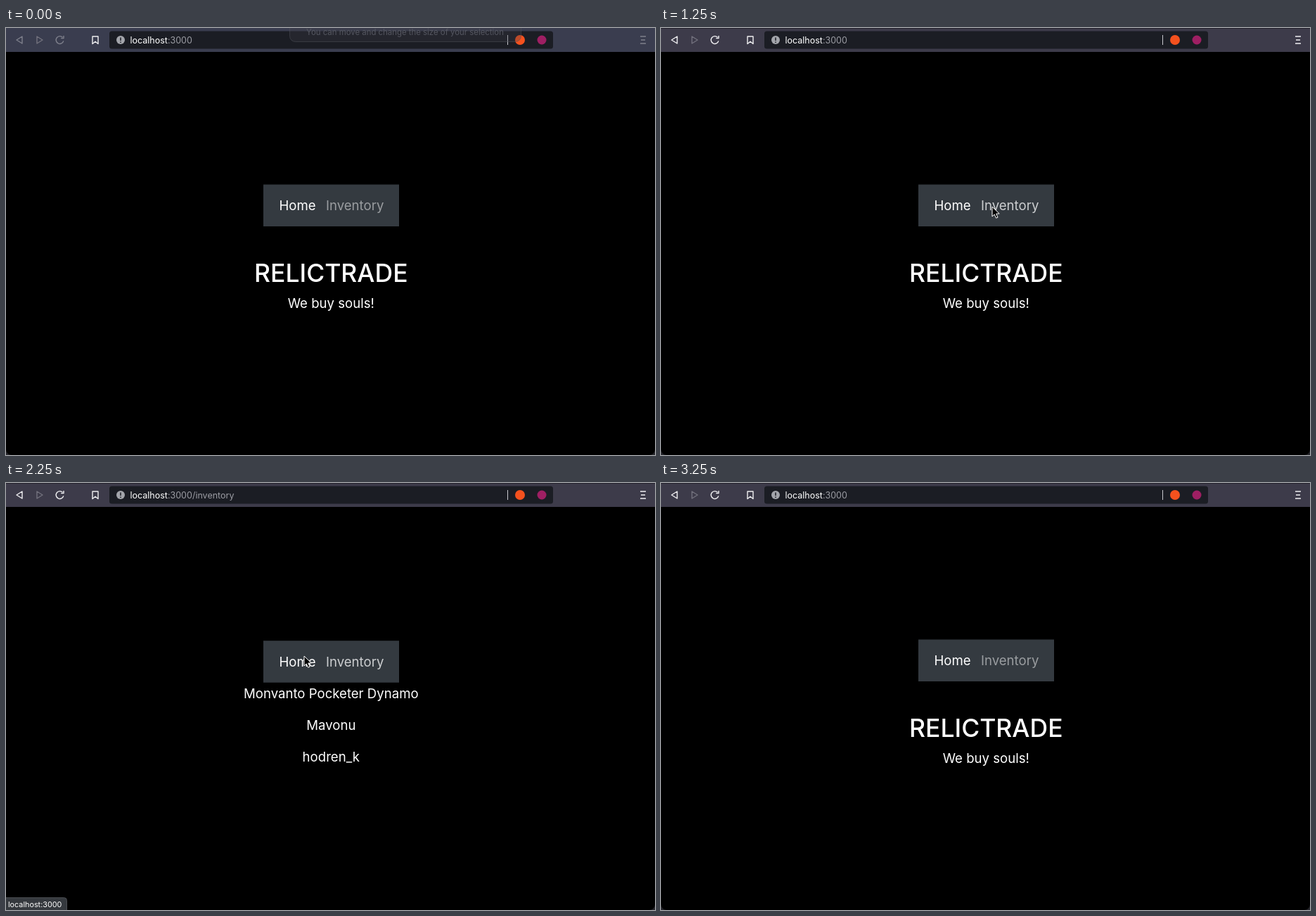
Write an HTML page that moves like this. It is 923 by 607 pixels and loops after 3500 ms.

```html
<!DOCTYPE html>
<html lang="en">
<head>
<meta charset="utf-8">
<title>Shop demo</title>
<style>
  html, body { margin: 0; width: 100%; height: 100%; overflow: hidden; background: #000; }
  svg { display: block; width: 923px; height: 607px; }
  text { font-family: Inter, Roboto, sans-serif; fill: #fff; }
  .mid { text-anchor: middle; }
  .body { font-size: 18.6px; }
  .line { fill: none; stroke-width: 1.4; stroke-linejoin: round; }
</style>
</head>
<body>
<svg viewBox="0 0 923 607">
  <rect width="923" height="607"/>

  <rect id="toolbar" width="923" height="34"/>
  <rect id="topEdge" width="923" height="1" fill="#24222c"/>
  <g class="line">
    <path class="chrome" d="M15 17L23 12V22Z"/>
    <path d="M44 12L52 17L44 22Z" stroke="#73727e"/>
    <path class="chrome" d="M80.6 13.4A5.4 5.4 0 1 0 81.8 18.4M82 11V14.6H78.2"/>
    <path d="M123 12H131V22.5L127 19.2L123 22.5Z" stroke="#eeeef0"/>
    <path class="chrome" d="M902 12H910M903 17H909M902 22H910"/>
  </g>
  <rect id="bar" x="147" y="4.5" width="631" height="25" rx="3.5"/>
  <circle cx="163" cy="17" r="6" fill="#a3a5ab"/>
  <path d="M163 13.5V18M163 19.4V21" stroke="#1b1d24" stroke-width="1.5"/>
  <text x="176.5" y="21.5" font-size="12.5">localhost<tspan id="path" fill="#9b9ca3"></tspan></text>
  <path d="M713.5 10V24" stroke="#c9cacf"/>
  <circle cx="731" cy="17" r="7" fill="#f4511e"/>
  <circle cx="762" cy="17" r="6.5" fill="#9e1f63"/>

  <g id="hint">
    <rect x="403.5" y="-12" width="329" height="31.5" rx="8" fill="#3c3e46" fill-opacity=".3" stroke="#50525b" stroke-opacity=".5"/>
    <text class="mid" x="567.5" y="9.7" font-size="11.4" style="fill:#555761">You can move and change the size of your selection</text>
  </g>

  <g id="nav">
    <rect x="366" y="222.5" width="193" height="59.5" fill="#343a40"/>
    <text class="mid body" x="414.5" y="259.3">Home</text>
    <text id="link" class="mid body" x="496.2" y="259.3">Inventory</text>
  </g>
  <g id="home" class="mid">
    <text x="462.3" y="360.5" font-size="35.5" font-weight="500">RELICTRADE</text>
    <text class="body" x="462.3" y="398">We buy souls!</text>
  </g>
  <g id="inventory" class="mid body">
    <text x="462.3" y="306">Monvanto Pocketer Dynamo</text>
    <text x="462.3" y="351">Mavonu</text>
    <text x="462.3" y="396">hodren_k</text>
  </g>

  <path d="M0 599A8 8 0 0 0 8 607H0ZM923 599A8 8 0 0 1 915 607H923Z" fill="#24242a"/>
  <g id="status">
    <path id="bubble" fill="#35393e" stroke="#4a4d52"/>
    <text id="statusText" x="3" y="602.7" font-size="10.8"></text>
  </g>
  <path id="cursor" d="M0 0V14L3.2 11L5.6 16.2L8 15.2L5.7 10.1L10.2 9.9Z" fill="#000" stroke="#fff"/>
</svg>
<script>
const LOOP = 3500, STEP = 250;
const $ = id => document.getElementById(id);
const chrome = document.querySelectorAll('.chrome');

// Pointer tip per step; null while it is off the page.
const tips = [
  null, [496, 71], [425, 196], [407, 248], [407, 246], [471, 254], [480, 254],
  [489, 255], [475, 253], [424, 246], [419, 246], [419, 246], null, null
];

const show = (id, on) => $(id).setAttribute('display', on ? 'inline' : 'none');
const within = (t, from, to) => t >= from && t < to;

function drawStatus(t) {
  show('status', within(t, 1750, 3250));
  const long = t < 2250;
  const right = long ? 136.5 : 86.5;
  $('bubble').setAttribute('d', `M-1 589.5H${right - 4}Q${right} 589.5 ${right} 593.5V608H-1Z`);
  $('statusText').textContent = 'localhost:3000' + (long ? '/inventory' : '');
}

function draw(t) {
  const active = t >= 1000;
  const listing = within(t, 1500, 2500);
  const hover = within(t, 1250, 2500);

  $('toolbar').setAttribute('fill', active ? '#3d3b4a' : '#3a3d4f');
  show('topEdge', active);
  chrome.forEach(el => el.setAttribute('stroke', active ? '#f0f0f2' : '#7f808c'));
  $('bar').setAttribute('fill', within(t, 3000, 3250) ? '#22242b' : '#1b1d24');
  $('path').textContent = ':3000' + (within(t, 1500, 2750) ? '/inventory' : '');
  show('hint', t < 250);

  $('nav').setAttribute('transform', `translate(0 ${listing ? 1.7 : 0})`);
  $('link').style.fill = hover ? '#ccced0' : '#9a9da0';
  show('home', !listing);
  show('inventory', listing);
  drawStatus(t);

  const tip = tips[Math.floor(t / STEP)];
  show('cursor', tip);
  if (tip) $('cursor').setAttribute('transform', `translate(${tip})`);
}

const start = performance.now();
function tick() {
  draw((performance.now() - start) % LOOP);
  requestAnimationFrame(tick);
}
tick();
</script>
</body>
</html>
```
